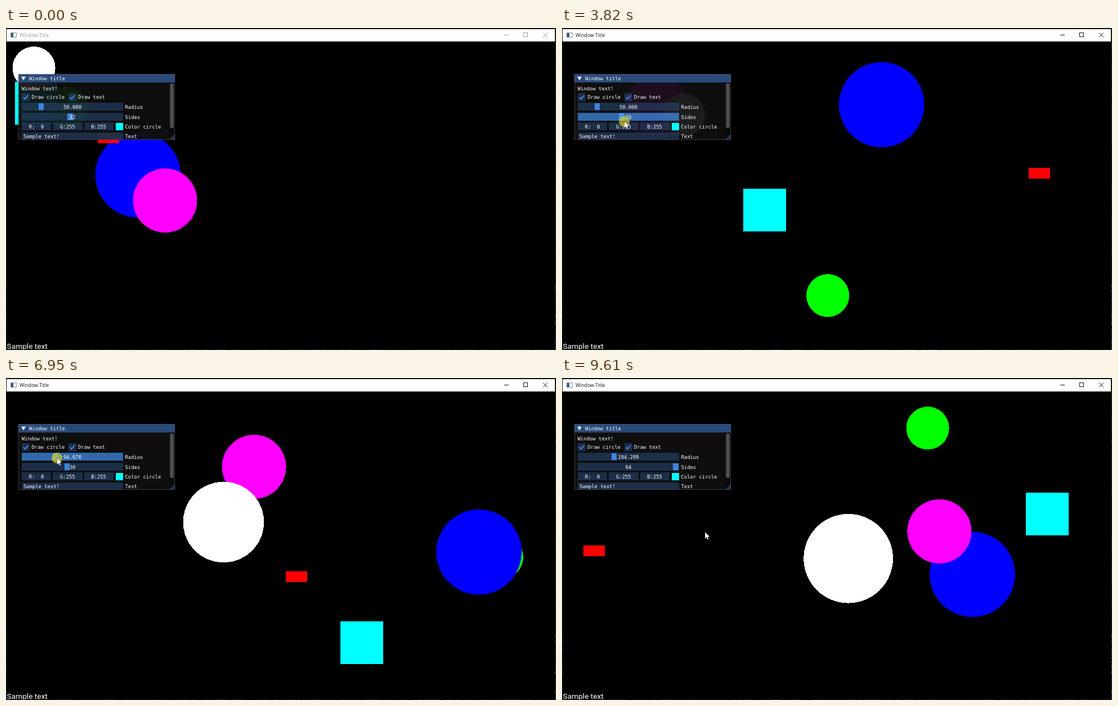
Recreate the animation shown at these times as an HTML page with a canvas. Size 977 by 573 pixels, loop 9680 ms.

```html
<!DOCTYPE html>
<html lang="en">
<head>
<meta charset="utf-8">
<title>Window Title</title>
<style>
html, body { margin: 0; width: 100%; height: 100%; overflow: hidden; background: #000; }
canvas { display: block; }
</style>
</head>
<body>
<canvas id="stage" width="977" height="573"></canvas>
<script>
const ctx = document.getElementById('stage').getContext('2d');
const LOOP = 9680, STEP = 69.64, LAST_STEP = 138;
const SCALE = 0.7609; // screen pixels per app unit
const LAG = 20;       // slider values trail the pointer
const MONO = '8.85px "DejaVu Sans Mono", monospace';
const FRAME_BG = 'rgba(41,74,122,.54)';
const ROW = { radius: 133, sides: 151, color: 168, text: 186 };

// Pointer stops; `drag` names the slider held until the next stop
const STOPS = [
  { t: 1400, x: 235, y: 330 },
  { t: 1950, x: 114, y: 162, drag: 'sides' },
  { t: 3300, x: 26, y: 166, drag: 'sides' },
  { t: 4200, x: 160, y: 166, drag: 'sides' },
  { t: 4970, x: 109, y: 163 },
  { t: 5280, x: 58, y: 144 },
  { t: 5500, x: 62.5, y: 144, drag: 'radius' },
  { t: 5850, x: 164.8, y: 143, drag: 'radius' },
  { t: 6750, x: 49, y: 142, drag: 'radius' },
  { t: 7000, x: 93, y: 142 },
  { t: 7640, x: 114, y: 164 },
  { t: 7960, x: 114, y: 162, drag: 'sides' },
  { t: 8850, x: 203, y: 161 },
  { t: 9580, x: 254, y: 274 },
];

function pointer(t) {
  const i = STOPS.findLastIndex(stop => stop.t <= t);
  if (i < 0) return null;
  const a = STOPS[i], b = STOPS[i + 1] || a;
  const u = a === b ? 0 : (t - a.t) / (b.t - a.t);
  const ease = u * u * (3 - 2 * u);
  return { x: a.x + (b.x - a.x) * ease, y: a.y + (b.y - a.y) * ease, drag: a.drag };
}

function sliderValue(name, t, min, max, rest) {
  const p = pointer(t - LAG);
  if (!p || p.drag !== name) return rest;
  const part = Math.min(1, Math.max(0, (p.x - 34.6) / 167.2));
  return min + (max - min) * part;
}

// Travel at constant speed, reflecting between two walls
function bounce(start, speed, lo, hi, tick) {
  const span = hi - lo;
  const d = (((start + speed * SCALE * tick - lo) % (2 * span)) + 2 * span) % (2 * span);
  return lo + (d > span ? 2 * span - d : d);
}

// Rectangle snapped to whole pixels
function rect(x, y, w, h, color) {
  const left = Math.round(x), top = Math.round(y);
  ctx.fillStyle = color;
  ctx.fillRect(left, top, Math.round(x + w) - left, Math.round(y + h) - top);
}

function poly(points, color) {
  ctx.fillStyle = color;
  ctx.beginPath();
  points.forEach(([x, y]) => ctx.lineTo(x, y));
  ctx.closePath();
  ctx.fill();
}

// Regular polygon with a vertex on top, filled row by row for hard edges
function disc(cx, cy, r, color, sides = 64) {
  const apothem = r * Math.cos(Math.PI / sides);
  for (let y = Math.floor(cy - r); y <= cy + r; y++) {
    const dy = y + 0.5 - cy;
    let half = Math.sqrt(Math.max(0, r * r - dy * dy));
    for (let i = 0; i < sides / 2; i++) {
      const a = (i + 0.5) * 2 * Math.PI / sides;
      half = Math.min(half, (apothem + dy * Math.cos(a)) / Math.sin(a));
    }
    if (half > 0) rect(cx - half, y, 2 * half, 1, color);
  }
}

function line(points, color, width = 1) {
  ctx.strokeStyle = color;
  ctx.lineWidth = width;
  ctx.beginPath();
  points.forEach(([x, y]) => ctx.lineTo(x, y));
  ctx.stroke();
}

function text(str, x, y, color = '#fff', font = MONO, align = 'left') {
  ctx.font = font;
  ctx.textAlign = align;
  ctx.fillStyle = color;
  ctx.fillText(str, x, y);
}

function drawShapes(n, radius, sides) {
  disc(bounce(109, -3, 40.6, 937.5, n), bounce(142.8, 2, 62, 533.7, n), 38, '#0f0');
  disc(bounce(234.4, 2, 77, 899.4, n), bounce(261.5, 4, 99.8, 495.55, n), 75.8, '#00f');
  disc(bounce(282.5, -2, 58.7, 918, n), bounce(307, -1, 81.1, 515, n), 57, '#f0f');
  rect(bounce(162.8, 4, 1, 935.8, n), bounce(185.5, 4, 24, 550.5, n), 38, 19, '#f00');
  rect(bounce(16, -2, 2.3, 899, n), bounce(96, -2, 24.4, 495.9, n), 76, 76, '#0ff');
  const r = radius * SCALE;
  disc(11.5 + n * SCALE + r, 33 + n * SCALE / 2 + r, r, '#fff', sides);
}

// Thin strip of desktop showing around the window
function drawDesktopEdge() {
  const noise = i => Math.abs(Math.sin(i * 12.9898) * 43758.5453) % 1;
  for (let x = 0; x < 977; x += 3) {
    const v = noise(x) * 60;
    rect(x, 572, 3, 1, `rgb(${v * 0.5},${v * 0.8},${v + 12})`);
  }
  for (let y = 0; y < 573; y += 3) {
    const v = 30 + noise(y + 0.5) * (y > 455 ? 90 : 40);
    rect(976, y, 1, 3, `rgb(${v * 0.8},${v * 0.9},${v})`);
    if (y > 455) rect(0, y, 1, 3, `rgb(${v * 0.3},${v * 0.5},${v * 0.8})`);
  }
}

function drawWindow(active) {
  rect(0, 0, 977, 2, '#101116');
  rect(0, 2, 1, 571, active ? '#16181c' : '#303338');
  drawDesktopEdge();
  rect(1, 2, 974, 22, '#fff');

  const ink = active ? '#111' : '#999';
  rect(8, 8, 11, 9, '#8a929c');
  rect(9, 9, 9, 7, '#f4f6f8');
  rect(9, 9, 4, 7, '#315a86');
  text('Window Title', 24, 16, ink, '8.7px "Open Sans", sans-serif');
  line([[885, 12.5], [893, 12.5]], ink);
  ctx.strokeRect(919.5, 8.5, 7, 7);
  line([[954, 8.5], [962, 16.5]], ink);
  line([[962, 8.5], [954, 16.5]], ink);
}

function slider(y, label, value, fraction, state) {
  const fill = { idle: FRAME_BG, hover: 'rgba(66,150,250,.4)', active: 'rgba(66,150,250,.67)' };
  rect(28, y, 180, 14, fill[state]);
  rect(29.9 + 167.2 * fraction, y + 1, 9.4, 12, state === 'active' ? '#4296fa' : '#3d85e0');
  text(value, 118, y + 10.5, '#fff', MONO, 'center');
  text(label, 211.5, y + 10.5);
}

function checkbox(x, label) {
  rect(x, 116, 14, 14, FRAME_BG);
  line([[x + 3, 123.2], [x + 5.9, 126.2], [x + 11.5, 119.8]], '#4296fa', 1.7);
  text(label, x + 17.5, 126.2);
}

function drawPanel(radius, sides, state) {
  rect(22, 82, 278, 117, 'rgba(15,15,15,.94)');
  rect(22, 82, 278, 15, '#294a7a');
  poly([[27, 86.5], [35, 86.5], [31, 93.3]], '#fff');
  text('Window title', 41, 93);

  ctx.save();
  ctx.beginPath();
  ctx.rect(22, 97, 278, 101);
  ctx.clip();
  text('Window text!', 27.8, 111);
  checkbox(28, 'Draw circle');
  checkbox(110.5, 'Draw text');
  slider(ROW.radius, 'Radius', radius.toFixed(3), radius / 300, state('radius'));
  slider(ROW.sides, 'Sides', String(sides), (sides - 3) / 61, state('sides'));
  ['R:  0', 'G:255', 'B:255'].forEach((label, i) => {
    rect(28 + i * 55.3, ROW.color, 52.3, 14, FRAME_BG);
    text(label, 54 + i * 55.3, ROW.color + 10.6, '#fff', MONO, 'center');
  });
  rect(195, 169, 13, 13, '#0ff');
  text('Color circle', 211.5, ROW.color + 10.6);
  rect(28, ROW.text, 180, 14, FRAME_BG);
  text('Sample text!', 31, ROW.text + 10.2);
  text('Text', 211.5, ROW.text + 10.2);

  rect(290, 97, 10, 101, 'rgba(5,5,5,.53)');
  ctx.fillStyle = '#4f4f4f';
  ctx.beginPath();
  ctx.roundRect(291.2, 98.5, 6.6, 79.5, 3);
  ctx.fill();
  poly([[300, 188.3], [300, 198.5], [289.5, 198.5]], '#1c3150');
  ctx.restore();

  ctx.strokeStyle = 'rgba(110,110,128,.5)';
  ctx.lineWidth = 1;
  ctx.strokeRect(22.5, 82.5, 277, 116);
}

function drawPointer({ x, y, drag }) {
  if (drag) {
    ctx.fillStyle = 'rgba(205,200,45,.72)';
    ctx.beginPath();
    ctx.arc(x, y + 0.4, 9.6, 0, Math.PI * 2);
    ctx.fill();
  }
  const arrow = [[0, 0], [0, 12.2], [2.8, 9.7], [4.7, 13.8], [6.7, 12.9], [4.9, 9], [8.6, 8.8]];
  const points = arrow.map(([dx, dy]) => [x + dx, y + dy]);
  poly(points, '#fff');
  line([...points, points[0]], 'rgba(0,0,0,.7)', 0.6);
}

function draw(now) {
  const step = Math.min(LAST_STEP, Math.floor((now % LOOP + 14) / STEP));
  const t = step * STEP;
  const tick = Math.floor(3.977 * step + 0.3);
  const p = pointer(t);
  const radius = sliderValue('radius', t, 0, 300, t < 6000 ? 50 : 104.299);
  const sidesAtRest = t < 2000 ? 32 : t < 8000 ? 30 : 64;
  const sides = Math.round(sliderValue('sides', t, 3, 64, sidesAtRest));
  const state = name => {
    if (!p) return 'idle';
    if (p.drag) return p.drag === name ? 'active' : 'idle';
    const over = p.x >= 28 && p.x <= 208 && p.y >= ROW[name] && p.y <= ROW[name] + 14;
    return over ? 'hover' : 'idle';
  };

  rect(0, 0, 977, 573, '#000');
  ctx.save();
  ctx.beginPath();
  ctx.rect(1, 24, 974, 548);
  ctx.clip();
  drawShapes(tick, radius, sides);
  text('Sample text', 1.6, 571.3, '#fff', '13.7px Roboto, sans-serif');
  drawPanel(radius, sides, state);
  if (p) drawPointer(p);
  ctx.restore();
  drawWindow(t > 450);
}

function loop() {
  draw(performance.now());
  requestAnimationFrame(loop);
}
loop();
</script>
</body>
</html>
```
